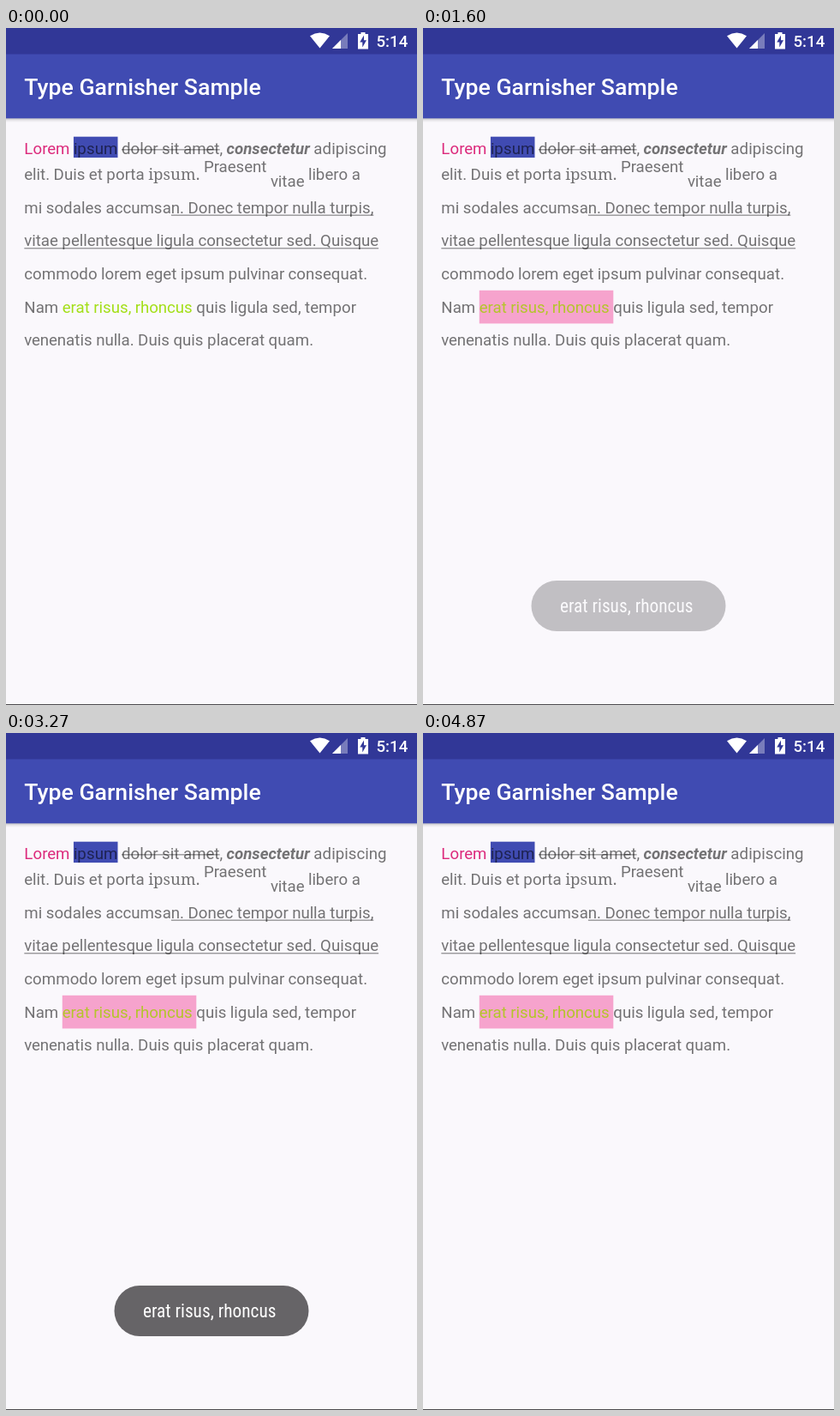
An HTML page for the animation above (4940 ms loop, 480 px wide and 789 px high).

```html
<!DOCTYPE html>
<html lang="en">
<head>
<meta charset="utf-8">
<title>Decorated text</title>
<style>
  html, body { margin: 0; width: 100%; height: 100%; overflow: hidden; background: #faf8fc; }
  svg { display: block; width: 480px; height: 789px; font-family: Roboto, sans-serif; }
  #copy { --ink: rgba(0, 0, 0, .54); }
  #copy text { white-space: pre; }
  #copy text, #copy .rule { fill: var(--ink); }
  #copy .blur { filter: blur(1.7px); }
  .pink { --ink: #dc2a7c; }
  .box .back { fill: #404bb2; }
  .link { --ink: #a3df18; }
  .link .back { fill: #f6a3cd; visibility: hidden; }
  .pressed .link { --ink: #b4c52b; }
  .pressed .link .back { visibility: visible; }
  #toastText { font-family: "Roboto Condensed", Roboto, sans-serif; font-stretch: 75%; }
</style>
</head>
<body>
<svg viewBox="0 0 480 789">
  <defs>
    <linearGradient id="shade" x2="0" y2="1">
      <stop stop-opacity=".24"/>
      <stop offset=".5" stop-opacity=".08"/>
      <stop offset="1" stop-opacity="0"/>
    </linearGradient>
  </defs>
  <rect y="105" width="480" height="5" fill="url(#shade)"/>
  <rect width="480" height="105.3" fill="#404bb2"/>
  <rect width="480" height="30.5" fill="#313797"/>
  <g fill="#fff">
    <path d="M366.5 23.6L355 9.2Q366.5 1.8 378 9.2Z"/>
    <path d="M399 6V24H381Z" opacity=".35"/>
    <path d="M391 14V24H381Z"/>
    <path d="M411 7H414.5V5H419.5V7H423V24.5H411Z"/>
    <path d="M418 8.5L413.3 16.5H416.3V22.5L421 14.2H418Z" fill="#313797"/>
    <text x="432.5" y="22" font-size="18.667" font-weight="500">5:14</text>
    <text x="21.33" y="78" font-size="26.667" font-weight="500">Type Garnisher Sample</text>
  </g>
  <g id="copy" transform="scale(.444444)"></g>
  <g id="toast" opacity="0">
    <rect x="126.5" y="644" width="227" height="59" rx="29.5" fill="#666467"/>
    <text id="toastText" x="160" y="681" font-size="20" fill="#fff">erat risus, rhoncus</text>
  </g>
  <rect y="788" width="480" height="1" fill="#4c4b4e"/>
</svg>
<script>
const LOOP = 4940, STEP = 1000 / 15;
const PRESS = 1260, SHOW = 1390, HIDE = 3470, FADE = 500;
const $ = id => document.getElementById(id);

// The copy is laid out in device pixels, where every glyph advance is a whole number.
const SIZE = 42, MARGIN = 48;
const FONTS = {
  strong: `italic 700 ${SIZE}px Roboto, sans-serif`,
  serif: `${SIZE}px 'Noto Serif', serif`
};
const PLAIN = `${SIZE}px Roboto, sans-serif`;
const SHIFT = { sup: -19, sub: 19 };
const RULE = { strike: -12, under: SIZE / 9 };
const BACK = { box: [-45, 55], link: [-58, 87] };

const ctx = document.createElement('canvas').getContext('2d');
const width = s => ctx.measureText(s).width;
const kern = (a, b) => b ? width(a + b) - width(a) - width(b) : 0;
const rect = (cls, x, y, w, h) =>
  `<rect class="${cls}" x="${x}" y="${y}" width="${w}" height="${h}"/>`;

// Draws [text, style] runs one after another on a baseline.
function line(y, ...runs) {
  let pen = MARGIN;
  return runs.map(([text, style = '']) => {
    const font = FONTS[style] || PLAIN, from = pen;
    ctx.font = font;
    const parts = style === 'strong' ? [text] : text.split(/(Lo|o)/).filter(Boolean);
    const glyphs = parts.map(part => {
      const xs = [...part].map((c, i) => {
        const x = pen;
        pen += Math.round(width(c)) + kern(c, part[i + 1]);
        return x.toFixed(1);
      });
      const cls = parts.length > 1 && /^L?o$/.test(part) ? 'blur' : '';
      return `<text class="${cls}" x="${xs.join(' ')}" y="${y + (SHIFT[style] || 0)}">${part}</text>`;
    }).join('');
    const back = BACK[style], rule = RULE[style];
    return `<g class="${style}" style="font:${font}">` +
      (back ? rect('back', from, y + back[0], pen - from, back[1]) : '') + glyphs +
      (rule ? rect('rule', from, y + rule, pen - from, SIZE / 18) : '') + '</g>';
  }).join('');
}

const PITCH = 87, row = n => 398 + PITCH * n;
$('copy').innerHTML = [
  line(330, ['Lorem', 'pink'], [' '], ['ipsum', 'box'], [' '], ['dolor sit amet', 'strike'],
    [', '], ['consectetur', 'strong'], [' adipiscing']),
  line(row(0), ['elit. Duis et porta '], ['ipsum.', 'serif'], [' '], ['Praesent', 'sup'],
    [' '], ['vitae', 'sub'], [' libero a']),
  line(row(1), ['mi sodales accumsa'], ['n. Donec tempor nulla turpis,', 'under']),
  line(row(2), ['vitae pellentesque ligula consectetur sed. Quisque', 'under']),
  line(row(3), ['commodo lorem eget ipsum pulvinar consequat.']),
  line(row(4), ['Nam '], ['erat risus, rhoncus ', 'link'], ['quis ligula sed, tempor']),
  line(row(5), ['venenatis nulla. Duis quis placerat quam.'])
].join('');

// The condensed face may be missing, so choose the size that suits the pill.
const label = $('toastText');
label.setAttribute('font-size', 20 * 155.5 / label.getComputedTextLength());

const ease = x => .5 - .5 * Math.cos(Math.PI * Math.min(1, Math.max(0, x)));

function draw(ms) {
  const t = Math.floor((ms + 4) / STEP) * STEP;
  $('copy').classList.toggle('pressed', t >= PRESS);
  $('toast').setAttribute('opacity', ease((t - SHOW) / FADE) - ease((t - HIDE) / FADE));
}

const start = performance.now();
function tick() {
  draw((performance.now() - start) % LOOP);
  requestAnimationFrame(tick);
}
tick();
</script>
</body>
</html>
```
